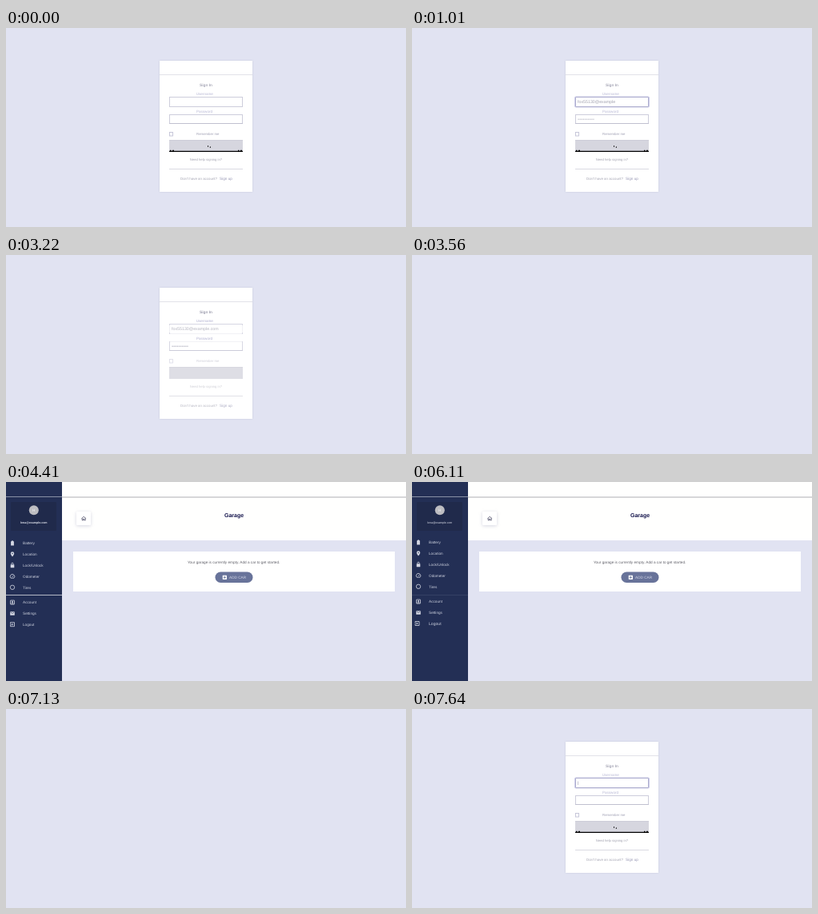
Recreate the animation shown at these times as an HTML page. Size 500x249 px, loop 8000 ms.

```html
<!DOCTYPE html>
<html lang="en">
<head>
<meta charset="utf-8">
<title>Sign in and garage</title>
<style>
html, body { margin: 0; width: 100%; height: 100%; overflow: hidden; background: #e1e3f2; }
svg { display: block; width: 100vw; height: 100vh; }
text { font: 4.7px "Liberation Sans", Arial, sans-serif; text-rendering: geometricPrecision; }
.mid { text-anchor: middle; }
.bold { font-weight: bold; }

/* Every change is a hard cut on an 8 s loop */
.login, .form, .focus, .caret, .typed, .filled, .pass, .idle, .busy, .faint, .strong,
.garage, .menu, .rule, .mail1, .mail2, .out1, .out2, .home { animation: 8s step-end infinite; }

.login { animation-name: login; }
.form { animation-name: form; }
.focus { animation-name: focus; }
.caret { animation-name: caret; }
.typed { animation-name: typed; }
.filled { animation-name: filled; }
.pass { animation-name: pass; }
.idle { animation-name: idle; }
.busy { animation-name: busy; }
.faint { animation-name: faint; }
.strong { animation-name: strong; }
.garage { animation-name: garage; }
.menu { animation-name: menu; }
.rule { animation-name: rule; }
.mail1 { animation-name: before; }
.mail2 { animation-name: after; }
.out1 { animation-name: outRest; }
.out2 { animation-name: outHover; }
.home { animation-name: home; }

@keyframes login { 0% { opacity: 1 } 44.5% { opacity: 0 } 91.25% { opacity: 1 } }
@keyframes form { 0% { opacity: 1 } 38.125% { opacity: .9 } 40.25% { opacity: .8 } 42.375% { opacity: .7 } 44.5% { opacity: 1 } }
@keyframes focus { 0% { opacity: 0 } 6.25% { opacity: 1 } 23.25% { opacity: 0 } 95.5% { opacity: 1 } }
@keyframes caret { 0% { opacity: 0 } 6.25% { opacity: 1 } 12.625% { opacity: 0 } 95.5% { opacity: 1 } }
@keyframes typed { 0% { opacity: 0 } 12.625% { opacity: 1 } 16.875% { opacity: 0 } }
@keyframes filled { 0% { opacity: 0 } 16.875% { opacity: 1 } 44.5% { opacity: 0 } }
@keyframes pass { 0% { opacity: 0 } 12.625% { opacity: .7 } 19% { opacity: 1 } 44.5% { opacity: 0 } }
@keyframes idle { 0% { opacity: 1 } 23.25% { opacity: 0 } 91.25% { opacity: 1 } }
@keyframes busy { 0% { opacity: 0 } 23.25% { opacity: 1 } 91.25% { opacity: 0 } }
@keyframes faint { 0% { opacity: 1 } 23.25% { opacity: .8 } 27.5% { opacity: .65 } 91.25% { opacity: 1 } }
@keyframes strong { 0% { opacity: .72 } 23.25% { opacity: 1 } 91.25% { opacity: .72 } }
@keyframes garage { 0% { opacity: 0 } 55.125% { opacity: 1 } 89.125% { opacity: 0 } }
@keyframes menu { 0% { transform: none } 63.625% { transform: translateY(-1px) } }
@keyframes rule { 0% { opacity: .9 } 63.625% { opacity: .12 } }
@keyframes before { 0% { opacity: 1 } 63.625% { opacity: 0 } }
@keyframes after { 0% { opacity: 0 } 63.625% { opacity: 1 } }
@keyframes outRest { 0% { opacity: 1 } 76.375% { opacity: 0 } }
@keyframes outHover { 0% { opacity: 0; transform: none } 76.375% { opacity: 1; transform: translateX(1px) } 78.5% { opacity: 1; transform: none } }
@keyframes home { 0% { stroke: #50506a } 82.75% { stroke: #4a4a98 } }

.card { filter: drop-shadow(0 .5px .8px #9a9cb255); }
.tile { filter: drop-shadow(0 1px 2px #8085a855); }
.field { fill: #fff; stroke: #cdcddc; }
.label { fill: #9c9cc4; font-size: 4.6px; }
.grey { fill: #a2a2b0; }
.menu text { fill: #ced2df; }
.line { fill: none; stroke: #d5d8e4; stroke-width: .8; }
.solid { fill: #d5d8e4; }
</style>
</head>
<body>
<svg viewBox="0 0 500 249" preserveAspectRatio="none">
  <defs>
    <path id="battery" class="solid" d="M-1-3h2v.7h.9V3h-3.8v-5.3h.9z"/>
    <path id="pin" class="solid" fill-rule="evenodd" d="M0 3.2C-1.4 1.3-2.2.2-2.2-.9a2.2 2.2 0 0 1 4.4 0C2.2.2 1.4 1.3 0 3.2zM-.7-.9a.7.7 0 1 0 1.4 0a.7.7 0 1 0-1.4 0z"/>
    <g id="lock"><path class="line" d="M-1.2-.8v-1a1.2 1.2 0 0 1 2.4 0v1"/><rect class="solid" x="-2.3" y="-1" width="4.6" height="4" rx=".5"/></g>
    <path id="gauge" class="line" d="M-2 2.2A2.8 2.8 0 1 1 2 2.2zM-.2 .8L1.3-1"/>
    <circle id="tire" class="line" r="2.7"/>
    <g id="user"><rect class="line" x="-2.5" y="-2.5" width="5" height="5" rx=".4"/><circle class="solid" cy="-.7" r="1"/><path class="solid" d="M-1.7 2a1.7 1.3 0 0 1 3.4 0z"/></g>
    <g id="mail"><rect class="solid" x="-2.8" y="-2.2" width="5.6" height="4.5" rx=".5"/><path d="M-2.3-1.4L0 .1 2.3-1.4" fill="none" stroke="#232f55" stroke-width=".6"/></g>
    <g id="exit"><path class="line" d="M-2.5-.9v-1.6h5v5h-5v-1.6M-3 0h3.6M-.5-1.2L.7 0-.5 1.2"/></g>
  </defs>

  <rect width="500" height="249" fill="#e1e3f2"/>

  <g class="login">
    <rect class="card" x="192" y="41" width="116" height="164" fill="#fff"/>
    <path d="M192 58.5h116" stroke="#e2e2e8"/>
    <g class="form">
      <g class="strong">
        <text class="mid bold" x="250" y="72.7" fill="#85859a" style="font-size:4.8px">Sign In</text>
        <text class="mid label" x="248.3" y="84.2">Username</text>
        <text class="mid label" x="248" y="105.8">Password</text>
      </g>

      <rect class="field" x="204.5" y="86.5" width="91" height="12"/>
      <rect class="field" x="204.5" y="108.5" width="91" height="11"/>
      <path d="M204 119.5h92" stroke="#c0c0d0"/>
      <g class="busy">
        <path d="M204.5 88v9M295.5 88v9M205 98.5h90M205 108.5h90" stroke="#fff" opacity=".65"/>
      </g>
      <g class="focus">
        <rect x="204" y="86.5" width="92" height="12" rx=".8" fill="none" stroke="#cfcfea" stroke-width="2"/>
        <rect x="204.5" y="86.5" width="91" height="12" rx=".5" fill="#fff" stroke="#adadce"/>
      </g>
      <path class="caret" d="M207.3 90.5v4.5" stroke="#8888a0" stroke-width=".6"/>
      <g class="grey" style="font-size:5.3px">
        <text class="typed" x="207" y="94.4" style="font-size:5.3px">fox55130@example</text>
        <text class="filled" x="207" y="94.4" style="font-size:5.3px">fox55130@example.com</text>
      </g>
      <path class="pass" d="M207.5 114.2h20" stroke="#85859a" stroke-width="1" stroke-dasharray="1.2 .9"/>

      <g class="faint">
        <rect x="204.5" y="130.5" width="4" height="4.5" fill="#fff" stroke="#c2c2d6" stroke-width=".9"/>
        <text class="mid" x="252.3" y="134.2" fill="#a0a0b4" style="font-size:4.3px">Remember me</text>
        <text class="mid grey" x="250" y="166.4" style="font-size:4.2px">Need help signing in?</text>
      </g>

      <rect x="204" y="140" width="92" height="15" fill="#d6d6df"/>
      <path d="M204 140.5h92" stroke="#cdcdd8"/>
      <g class="idle">
        <path d="M204 154.4h92" stroke="#000" stroke-width="1.2"/>
        <path d="M205 153.4h1.5M208 153.4h2M290 153.4h1.5M293 153.4h2M252 148h1M254.8 149.2h1.2" stroke="#000" stroke-width="1.3"/>
      </g>

      <path d="M204 176.5h92" stroke="#dadae2"/>
      <text class="grey" x="218" y="189.8" style="font-size:4.4px">Don't have an account?</text>
      <text x="267" y="189.8" fill="#9797b4">Sign up</text>
    </g>
  </g>

  <g class="garage">
    <rect x="70" width="430" height="73" fill="#fffffe"/>
    <rect x="70" y="18" width="430" height="2" fill="#d7d7d9"/>
    <rect class="tile" x="88" y="37" width="18" height="17" rx="1" fill="#fff"/>
    <path class="home" d="M94.4 45.8L97.2 43.3 100 45.8M95.2 45.3v2.6h1.4v-1.6h1.2v1.6h1.4v-2.6" fill="none" stroke-width=".8"/>
    <text class="mid bold" x="285" y="43.5" fill="#12124a" style="font-size:7px">Garage</text>

    <rect x="84" y="87" width="402" height="50" fill="#fff"/>
    <text class="mid" x="284.6" y="102" fill="#5f5f68">Your garage is currently empty. Add a car to get started.</text>
    <rect x="261.5" y="112.5" width="47" height="13.5" rx="6.75" fill="#68739a"/>
    <rect x="270.7" y="116.7" width="5.3" height="5.3" rx=".7" fill="#fff"/>
    <path d="M273.35 117.7v3.3M271.7 119.35h3.3" stroke="#68739a" stroke-width=".8"/>
    <text x="279" y="121" fill="#d6daea">ADD CAR</text>

    <rect width="70" height="249" fill="#232f55"/>
    <path d="M0 18.5h70" stroke="#8990a6"/>
    <rect x="6" y="25" width="57" height="36" rx="1" fill="#202a4b"/>
    <circle cx="34.8" cy="35.3" r="6" fill="#bdbdc1"/>
    <text class="mid" x="34.8" y="37" fill="#f4f4f6">H</text>
    <g class="mid" fill="#e4e7f0">
      <text class="mail1 bold" x="34.8" y="52.2" style="font-size:3.6px">lena@example.com</text>
      <text class="mail2" x="34.8" y="51.6" style="font-size:3.5px">lena@example.com</text>
    </g>
    <path class="rule" d="M0 141.5h70" stroke="#c4c8d4"/>

    <g class="menu">
      <use href="#battery" x="8" y="76.6"/><text x="21" y="78.3">Battery</text>
      <use href="#pin" x="8" y="90.4"/><text x="21" y="92.1">Location</text>
      <use href="#lock" x="8" y="104.2"/><text x="21" y="105.9">Lock/Unlock</text>
      <use href="#gauge" x="8" y="118"/><text x="21" y="119.7">Odometer</text>
      <use href="#tire" x="8" y="131.8"/><text x="21" y="133.5">Tires</text>
      <use href="#user" x="8" y="150.6"/><text x="21" y="152.2">Account</text>
      <use href="#mail" x="8" y="164.4"/><text x="21" y="166">Settings</text>
      <g class="out1"><use href="#exit" x="8" y="178.2"/><text x="21" y="179.8">Logout</text></g>
      <g class="out2"><use href="#exit" x="5.5" y="178"/><text x="20" y="179.8" style="font-size:5.1px">Logout</text></g>
    </g>
  </g>
</svg>
</body>
</html>
```
